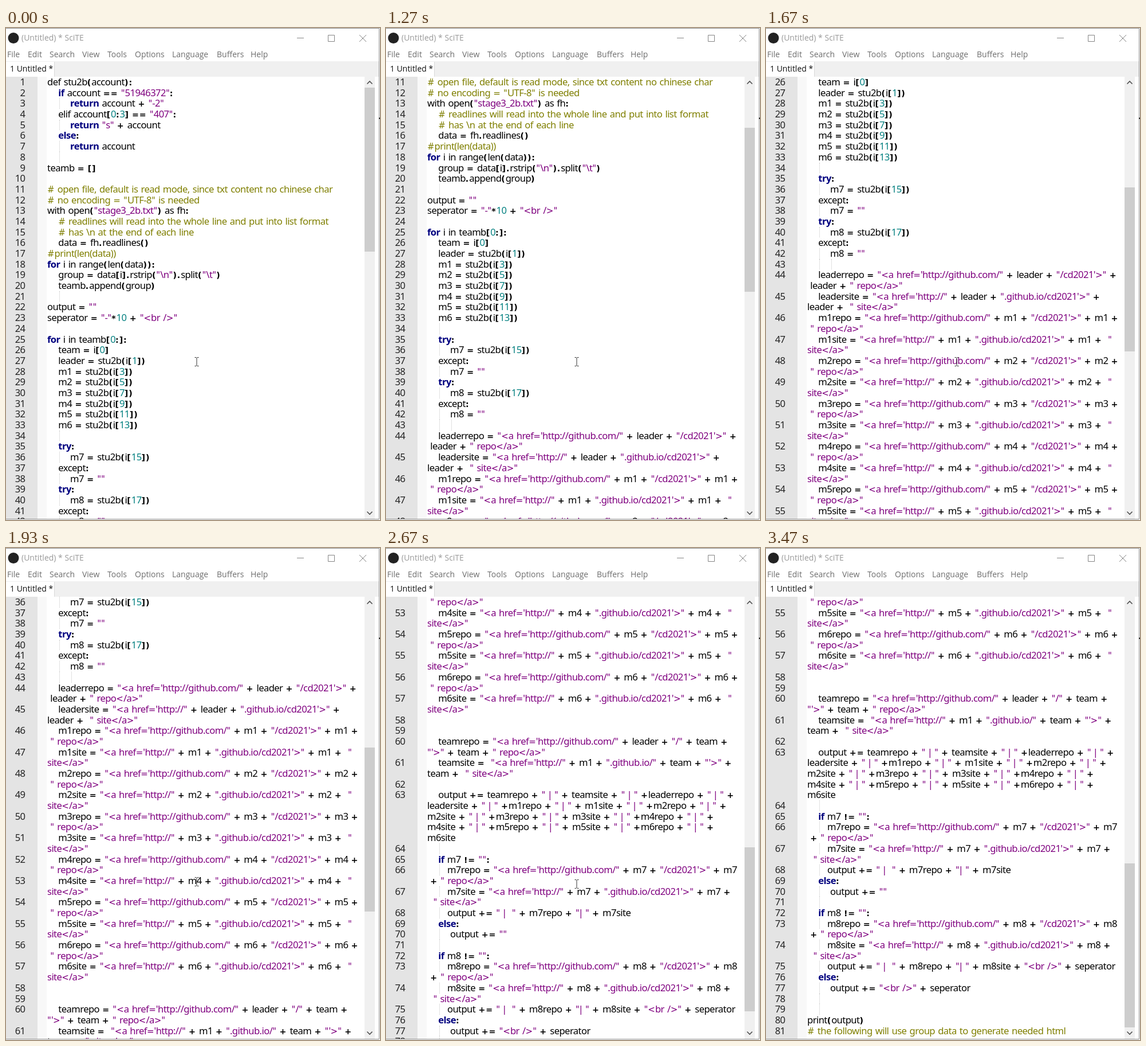
These frames come from a looping animation (653 px wide and 858 px high, 4.19 s). An HTML page:

```html
<!DOCTYPE html>
<html>
<head>
<meta charset="utf-8">
<style>
html, body { margin: 0; width: 100%; height: 100%; overflow: hidden; background: #fff; }
#stage { position: relative; width: 653px; height: 858px; overflow: hidden; background: #fff; }
#stage div, #stage svg { position: absolute; }
.ui { font: 14px/20px "Open Sans", "Noto Sans", sans-serif; white-space: pre; color: #6d6d6d; }
#edit { left: 0; top: 85px; width: 644px; height: 771px; overflow: hidden;
  background: linear-gradient(90deg, #e4e4e4 55px, #f8f8f8 55px 71px, #fff 71px); }
#code { left: 0; top: 0; font: 16.6px/18.69px "Noto Sans", sans-serif;
  letter-spacing: -.57px; word-spacing: 1.45px; white-space: pre; color: #000; }
#code .line { left: 72px; }
#code .num { left: 0; width: 33.5px; text-align: right; color: #222; }
#code .guide { width: 0; height: 18.69px; border-left: 1px dotted #c4c4c4; }
#code span { line-height: 0; }
.key { color: #00007f; font-weight: bold; }
.str { color: #7f007f; }
.dig { color: #007f7f; }
.com { color: #7f7f00; }
.op { font: bold 14.2px "DejaVu Sans", sans-serif; letter-spacing: .9px; }
.sym { font: 15px "DejaVu Sans", sans-serif; letter-spacing: 0; }
#bar { left: 626px; top: 85px; width: 18px; height: 771px; background: #f0f0f0; }
#thumb { left: 626px; width: 18px; height: 286px; background: #cdcdcd; }
#tabs { left: 0; top: 58px; width: 651px; height: 27px; background: #f0f0f0; }
#tab { left: 0; top: 59px; width: 84px; height: 26px; background: #fff; border-right: 1px solid #d9d9d9; }
</style>
</head>
<body>
<div id="stage">
  <div id="tabs"></div>
  <div id="tab"></div>
  <div id="edit"><div id="code"></div></div>
  <div id="bar"></div>
  <div id="thumb"></div>
  <svg width="653" height="858" fill="none">
    <circle cx="13" cy="17.5" r="9.5" fill="#222"/>
    <path d="M508 17.5h12M562.5 12.5h11v11h-11zM617 12l12 12M629 12l-12 12" stroke="#858585"/>
    <path d="M630.5 97.5l4.5-4.5 4.5 4.5M630.5 843.5l4.5 4.5 4.5-4.5" stroke="#505050" stroke-width="1.6"/>
    <path d="M0 .5h651.5V856.5H0" stroke="#8c8c8c"/>
    <path d="M651 157.5h2" stroke="#000" stroke-width="2"/>
    <path id="beam" d="M-3.5-7.5h2.5l1 1 1-1h2.5M0-6.5v13M-3.5 7.5h2.5l1-1 1 1h2.5" stroke="#333"/>
  </svg>
</div>
<script>
const $ = id => document.getElementById(id);
const ROW = 18.69, SPACE = 5.2, LOOP = 4190;

function add(parent, cls, html, x, y) {
  const el = document.createElement('div');
  el.className = cls;
  el.innerHTML = html;
  if (x !== null) el.style.left = x + 'px';
  el.style.top = y + 'px';
  parent.append(el);
}

const menu = { File: 2, Edit: 38, Search: 76, View: 133, Tools: 177, Options: 225, Language: 290, Buffers: 368, Help: 427 };
for (const name in menu) add($('stage'), 'ui', name, menu[name], 36);
add($('stage'), 'ui', '<span style="color:#999">(Untitled) * SciTE</span>', 27, 7);
add($('stage'), 'ui', '<span style="color:#111">1 Untitled *</span>', 7, 61);

// "~" marks a soft wrap
const PAD = '    ';
const members = f => [1, 2, 3, 4, 5, 6].map(f).join('\n');
const repo = (v, pad, end) => `${pad}${v}repo = "<a href='http://github.com/" + ${v} + "/cd2021'>" +${end}`;
const site = (v, pad, end) => `${pad}${v}site = "<a href='http://" + ${v} + ".github.io/cd2021'>" +${end}`;
const attempt = (v, i) => `    try:\n        ${v} = stu2b(i[${i}])\n    except:\n        ${v} = ""`;
const extra = (v, end) => `    if ${v} != "":
${repo(v, '       ', ` ${v}~ + " repo</a>"`)}
${site(v, '       ', ` ${v} +~  " site</a>"`)}
       output += " |  " + ${v}repo + "| " + ${v}site${end}
    else:`;

const source = [
String.raw`def stu2b(account):
    if account == "51946372":
        return account + "-2"
    elif account[0:3] == "407":
        return "s" + account
    else:
        return account`, PAD,
String.raw`teamb = []

# open file, default is read mode, since txt content no chinese char
# no encoding = "UTF-8" is needed
with open("stage3_2b.txt") as fh:
    # readlines will read into the whole line and put into list format
    # has \n at the end of each line
    data = fh.readlines()
#print(len(data))
for i in range(len(data)):
    group = data[i].rstrip("\n").split("\t")
    teamb.append(group)`, PAD,
`output = ""
seperator = "-"*10 + "<br />"

for i in teamb[0:]:
    team = i[0]
    leader = stu2b(i[1])`,
members(n => `    m${n} = stu2b(i[${2 * n + 1}])`), PAD,
attempt('m7', 15), attempt('m8', 17), PAD + PAD,
repo('leader', PAD, '~ leader + " repo</a>"'),
site('leader', PAD, '~leader +  " site</a>"'),
members(n => repo('m' + n, PAD, ` m${n} +~ " repo</a>"`) + '\n' + site('m' + n, PAD, ` m${n} +  "~site</a>"`)),
`

    teamrepo = "<a href='http://github.com/" + leader + "/" + team + ~"'>" + team + " repo</a>"
    teamsite =  "<a href='http://" + m1 + ".github.io/" + team + "'>" + ~team +  " site</a>"

    output += teamrepo + " | " + teamsite + " | " +leaderrepo + " | " + ~leadersite + " | " +m1repo + " | " + m1site + " | " +m2repo + " | " + ~m2site + " | " +m3repo + " | " + m3site + " | " +m4repo + " | " + ~m4site + " | " +m5repo + " | " + m5site + " | " +m6repo + " | " + ~m6site`,
PAD, extra('m7', ''), '        output += ""', PAD,
extra('m8', ' + "<br />" + seperator'), '        output += "<br />" + seperator', PAD, PAD,
`print(output)
# the following will use group data to generate needed html`
].join('\n').split('\n');

const span = (cls, s) => `<span class="${cls}">${s}</span>`;
const esc = s => s.replace(/</g, '&lt;').replace(/>/g, '&gt;');
const symbols = s => s.replace(/[<>="#|]/g, c => span('sym', esc(c)));
const TOKEN = /(#.*)|("[^"]*")|\b(if|for|return|else|try)\b|\b(\d+)\b|([-+*=!:.,()[\]]+)/g;
const paint = s => s.replace(TOKEN, (_, com, str, key, dig, op) =>
  com ? span('com', symbols(com)) : str ? span('str', symbols(str)) :
  key ? span('key', key) : dig ? span('dig', dig) : span('op', op)).replace(/~/g, '\n');

let row = 0;
source.forEach((s, i) => {
  const y = row * ROW, indent = s.search(/\S|$/);
  const last = s.trim() ? indent - 1 : indent;
  add($('code'), 'num', i + 1, null, y);
  for (let c = 4; c <= last; c += 4) add($('code'), 'guide', '', 72 + c * SPACE, y);
  add($('code'), 'line', paint(s), null, y);
  row += s.split('~').length;
});

// [time, first visible row]
const scroll = [[0, 0], [530, 5], [1270, 10], [1470, 15], [1530, 20], [1670, 25],
  [1930, 35], [2000, 45], [2070, 55], [2670, 60], [2730, 64]];

function draw(now) {
  const t = now % LOOP;
  const top = scroll.filter(s => s[0] <= t).pop()[1];
  $('code').style.top = -top * ROW + 'px';
  $('thumb').style.top = 104 + top * 6.97 + 'px';

  // the pointer leaves downwards in 15 fps ticks
  const tick = Math.floor((t + 4) * .015) - 40;
  const p = Math.max(0, tick / 11);
  const x = 333 - 155 * p ** 4;
  const y = (tick < 0 ? 581.5 : 585.5) + 261 * p * p;
  $('beam').setAttribute('transform', `translate(${Math.round(x)} ${Math.round(y)})`);
  $('beam').style.display = tick > 11 ? 'none' : '';
  requestAnimationFrame(draw);
}
requestAnimationFrame(draw);
</script>
</body>
</html>
```
